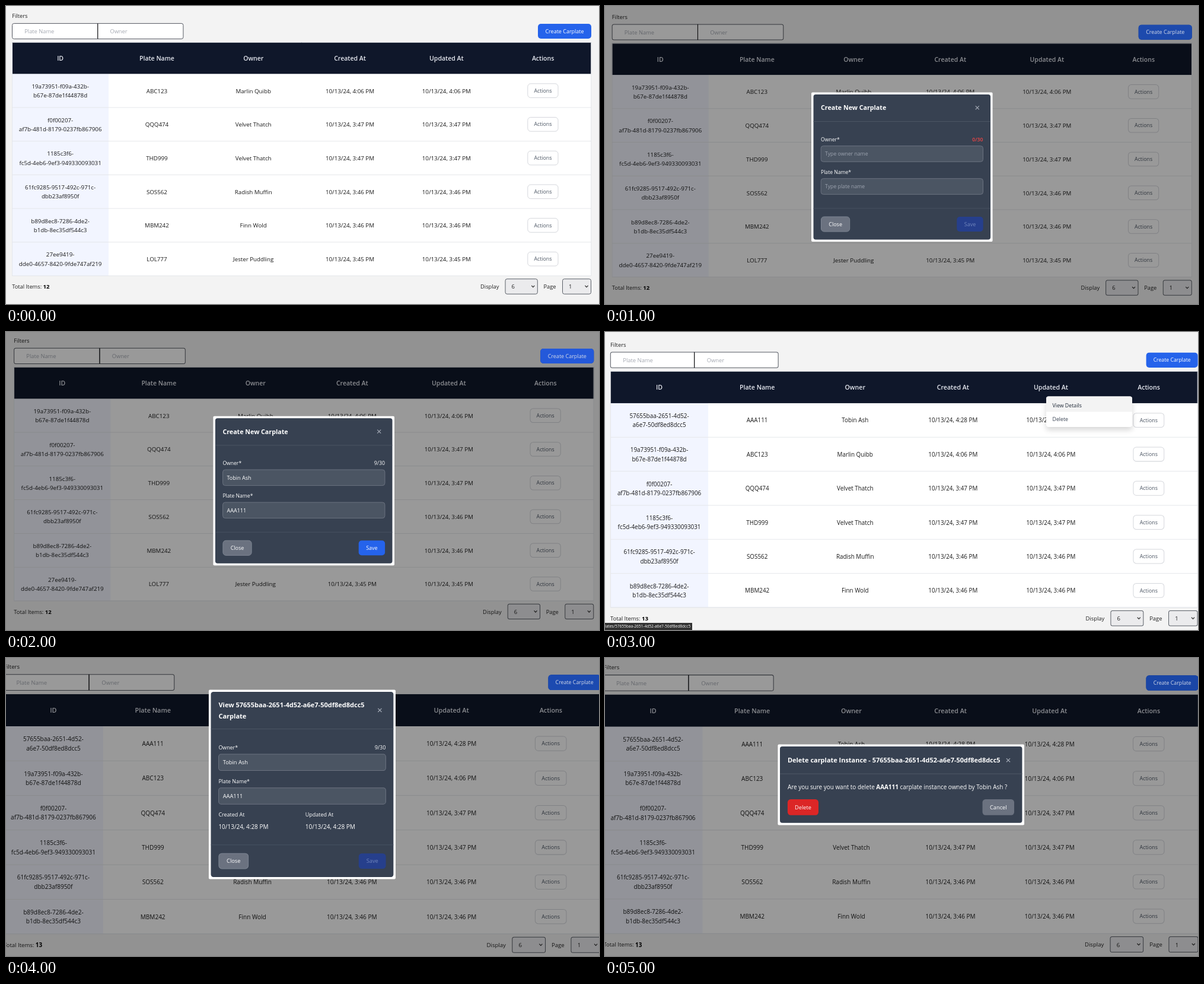
Recreate the animation shown at these times as an HTML page with a canvas. Size 1000x502 px, loop 6 s.

```html
<!DOCTYPE html>
<html lang="en">
<head>
<meta charset="utf-8">
<title>Carplate admin</title>
<style>
  html, body { margin: 0; width: 100%; height: 100%; overflow: hidden; background: #f3f3f3; }
  canvas { display: block; width: 1000px; height: 502px; }
</style>
</head>
<body>
<canvas id="stage" width="1000" height="502"></canvas>
<script>
const ctx = document.getElementById('stage').getContext('2d');
const FONT = '"Open Sans", "Noto Sans", sans-serif';
const SCENE_MS = 1000;
const ROW = 56.7, HEAD = 53.3;
const SLATE = '#374151', GREY = '#6b7280', BLUE = '#2563eb', LINE = '#e5e7eb';

const NEW_ID = '57655baa-2651-4d52-a6e7-50df8ed8dcc5';
const OWNER = 'Tobin Ash', PLATE = 'AAA111', CREATED = '10/13/24, 4:28 PM';
const records = [
  ['57655baa-2651-4d52-', 'a6e7-50df8ed8dcc5', PLATE, OWNER, '4:28'],
  ['19a73951-f09a-432b-', 'b67e-87de1f44878d', 'ABC123', 'Marlin Quibb', '4:06'],
  ['f0f00207-', 'af7b-481d-8179-0237fb867906', 'QQQ474', 'Velvet Thatch', '3:47'],
  ['1185c3f6-', 'fc5d-4eb6-9ef3-949330093031', 'THD999', 'Velvet Thatch', '3:47'],
  ['61fc9285-9517-492c-971c-', 'dbb23af8950f', 'SOS562', 'Radish Muffin', '3:46'],
  ['b89d8ec8-7286-4de2-', 'b1db-8ec35df544c3', 'MBM242', 'Finn Wold', '3:46'],
  ['27ee9419-', 'dde0-4657-8420-9fde747af219', 'LOL777', 'Jester Puddling', '3:45']
];

// x, y: top left of the table; s: zoom; col: column width on stage
const scenes = [
  { x: 10.2, y: 61, s: 1, col: 162.8 },
  { x: 11.8, y: 62.7, s: 1.001, col: 163, tint: '#1d4aad',
    modal: () => formModal(351.5, 149, 1, {}) },
  { x: 13.3, y: 59, s: 1.001, col: 163, tint: '#2459da',
    modal: () => formModal(352.9, 145.3, 1, { filled: true, canSave: true }) },
  { x: 9, y: 66, s: 1.0115, col: 165.1, added: true, modal: rowMenu },
  { x: -4, y: 60.2, s: 1.028, col: 167.8, added: true, tint: '#1c4ab0',
    modal: () => formModal(345.5, 57, 1.031, { filled: true, details: true }) },
  { x: -2.6, y: 61, s: 1.0245, col: 167.2, added: true, tint: '#1a46a6',
    modal: deleteModal }
];

// y is the middle of the capital letters
function text(str, x, y, size, color, align = 'left', weight = 400) {
  ctx.font = `${weight} ${size}px ${FONT}`;
  ctx.textAlign = align;
  ctx.fillStyle = color;
  ctx.fillText(str, x, y + size * 0.355);
  return ctx.measureText(str).width;
}

function box(x, y, w, h, radius, fill, stroke, lineWidth = 1) {
  ctx.beginPath();
  ctx.roundRect(x, y, w, h, radius);
  if (fill) { ctx.fillStyle = fill; ctx.fill(); }
  if (stroke) { ctx.strokeStyle = stroke; ctx.lineWidth = lineWidth; ctx.stroke(); }
}

function path(points, color, width) {
  ctx.beginPath();
  points.forEach(([x, y]) => ctx.lineTo(x, y));
  ctx.strokeStyle = color;
  ctx.lineWidth = width;
  ctx.stroke();
}

function button(x, y, w, h, label, fill, color = '#fff', size = 9, stroke) {
  box(x, y, w, h, 5, fill, stroke);
  text(label, x + w / 2, y + h / 2, size, color, 'center');
}

function zoomed(x, y, s, draw) {
  ctx.save();
  ctx.translate(x, y);
  ctx.scale(s, s);
  draw();
  ctx.restore();
}

function select(x, w, value) {
  box(x, 398.8, w, 25.4, 3, '#ebebed', '#5b6068');
  text(value, x + 10.5, 412, 9.4, '#222');
  const cx = x + w - 7.5;
  path([[cx - 2.5, 410], [cx, 412.6], [cx + 2.5, 410]], '#333', 1.2);
}

function createButton(scene, right, fill, color) {
  const w = scene.added ? 86 : 90;
  button(right - w, -31, w, 25, 'Create Carplate', fill, color, scene.added ? 8.6 : 9);
}

function filters(half) {
  text('Filters', 0, -44, 9.3, '#222');
  box(0.3, -31.6, half, 26, [3, 0, 0, 3], '#fff', '#555962');
  box(half + 0.3, -31.6, half, 26, [0, 3, 3, 0], '#fff', '#555962');
  path([[half + 0.3, -31.6], [half + 0.3, -5.6]], '#111', 1);
  text('Plate Name', 21, -18, 9.3, '#a5a9b2');
  text('Owner', half + 21, -18, 9.3, '#a5a9b2');
}

function table(rows, col) {
  const width = col * 6;
  const middle = i => col * (i + 0.5);
  ctx.fillStyle = '#fff';
  ctx.fillRect(0, HEAD, width, ROW * 6);
  ctx.fillStyle = '#f2f5ff';
  ctx.fillRect(0, HEAD, col, ROW * 6);
  ctx.fillStyle = '#0f172a';
  ctx.fillRect(0, 0, width, HEAD);
  ['ID', 'Plate Name', 'Owner', 'Created At', 'Updated At', 'Actions'].forEach((name, i) =>
    text(name, middle(i), 27.4, 10.5, '#e8ebf2', 'center', 600));

  rows.forEach(([idStart, idEnd, plate, owner, time], i) => {
    const y = HEAD + ROW * (i + 0.5);
    const date = `10/13/24, ${time} PM`;
    const cell = (str, c, dy = 0) => text(str, middle(c), y + dy, 9.75, '#1a1a1a', 'center');
    cell(idStart, 0, -7.2);
    cell(idEnd, 0, 8);
    [plate, owner, date, date].forEach((str, c) => cell(str, c + 1, 0.4));
    button(middle(5) - 25.8, y - 11.8, 51.2, 23.6, 'Actions', '#fff', '#4b5563', 8.8, '#d5d7dc');
    const bottom = HEAD + ROW * (i + 1);
    path([[0, bottom], [width, bottom]], LINE, 1);
  });
  box(0.3, 0.3, width - 0.6, HEAD + ROW * 6 - 0.3, 0, null, LINE);
}

function footer(count, right) {
  const w = text('Total Items: ', 0, 412, 9.3, '#222');
  text(count, w, 412, 9.5, '#000', 'left', 700);
  text('Display', right - 187, 412, 9.3, '#222');
  select(right - 145, 54.3, '6');
  text('Page', right - 80.5, 412, 9.3, '#222');
  select(right - 48.5, 48, '1');
}

function page(scene) {
  const { x, y, s, added, tint } = scene;
  const col = scene.col / s, right = col * 6;
  const first = added ? 0 : 1;
  ctx.fillStyle = '#f3f3f3';
  ctx.fillRect(0, 0, 1000, 502);
  zoomed(x, y, s, () => {
    filters(added ? 139.8 : 144.2);
    createButton(scene, right, BLUE);
    table(records.slice(first, first + 6), col);
    footer(added ? '13' : '12', right);
  });
  if (!tint) return;
  ctx.fillStyle = 'rgba(0,0,0,0.4)';
  ctx.fillRect(0, 0, 1000, 502);
  zoomed(x, y, s, () => createButton(scene, right, tint, '#d3d9e8'));
}

function panel(w, h, crossX, crossY, headerY) {
  box(-3.5, -3.5, w + 7, h + 7, 2, '#fff');
  box(0, 0, w, h, 4, SLATE);
  const r = 3;
  path([[crossX - r, crossY - r], [crossX + r, crossY + r]], '#a3aab6', 1.2);
  path([[crossX - r, crossY + r], [crossX + r, crossY - r]], '#a3aab6', 1.2);
  path([[0, headerY], [w, headerY]], '#4b5563', 1);
}

function field(label, value, placeholder, y) {
  text(label, 12.5, y, 8.6, '#fff');
  box(12.7, y + 10.7, 273.3, 26.6, 4, '#4b5563', GREY);
  text(value || placeholder, 19.6, y + 24.2, value ? 9 : 8.7, value ? '#fff' : '#9ca3af');
}

function formModal(x, y, s, { filled, canSave, details }) {
  const shift = details ? 15.2 : 0;
  const foot = details ? 58 : 0;
  zoomed(x, y, s, () => {
    panel(298.6, 244.5 + foot, 276.3, details ? 30 : 22.3, 45.5 + shift);
    const title = details ? [`View ${NEW_ID}`, 'Carplate'] : ['Create New Carplate'];
    title.forEach((line, i) =>
      text(line, 12.5, (details ? 21.4 : 22.7) + i * 18.4, 10.7, '#fff', 'left', 700));
    field('Owner*', filled && OWNER, 'Type owner name', 76 + shift);
    field('Plate Name*', filled && PLATE, 'Type plate name', 131 + shift);
    if (filled) text(`${OWNER.length}/30`, 286, 76 + shift, 8.7, '#fff', 'right');
    else text('0/30', 286, 76, 8.7, '#ef4444', 'right', 600);
    if (details) {
      ['Created At', 'Updated At'].forEach((label, i) => {
        text(label, 12.5 + i * 142, 201, 8.7, '#fff');
        text(CREATED, 12.5 + i * 142, 220.4, 9.7, '#fff');
      });
    }
    path([[0, 192 + foot], [298.6, 192 + foot]], '#465161', 1);
    button(13, 206 + foot, 48.2, 25, 'Close', GREY, '#fff', 9, '#7d8592');
    button(241.8, 206 + foot, 44.4, 25, 'Save',
      canSave ? BLUE : '#263f8c', canSave ? '#fff' : '#7186bd');
  });
}

function deleteModal() {
  zoomed(295, 149, 1.025, () => {
    panel(398.5, 125.7, 375.6, 22.6, 45);
    text(`Delete carplate Instance - ${NEW_ID}`, 12.6, 23, 10.7, '#fff', 'left', 700);
    let x = 12.6;
    const write = (str, weight) => { x += text(str, x, 66.6, 9.7, '#fff', 'left', weight); };
    write('Are you sure you want to delete ', 400);
    write(PLATE, 700);
    write(` carplate instance owned by ${OWNER} ?`, 400);
    button(12.6, 86.9, 50.8, 26, 'Delete', '#dc2626');
    button(333.2, 86.9, 52.2, 26, 'Cancel', GREY);
  });
}

function rowMenu() {
  ctx.save();
  ctx.shadowColor = 'rgba(0,0,0,0.16)';
  ctx.shadowBlur = 10;
  ctx.shadowOffsetY = 5;
  box(744, 108.5, 145, 51.5, 4, '#fff');
  ctx.restore();
  box(744, 108.5, 145, 26, [4, 4, 0, 0], '#f3f3f3');
  text('View Details', 754.5, 123.5, 8.8, '#1f2937');
  text('Delete', 754.5, 146.5, 8.8, SLATE);
  ctx.fillStyle = '#333';
  ctx.fillRect(0, 490, 147, 12);
  text(`lates/${NEW_ID}`, 0, 496, 6.6, '#fff');
}

function draw(now) {
  const scene = scenes[Math.floor(now / SCENE_MS) % scenes.length];
  page(scene);
  if (scene.modal) scene.modal();
}

const start = performance.now();
function tick() {
  draw(performance.now() - start);
  requestAnimationFrame(tick);
}
tick();
</script>
</body>
</html>
```
